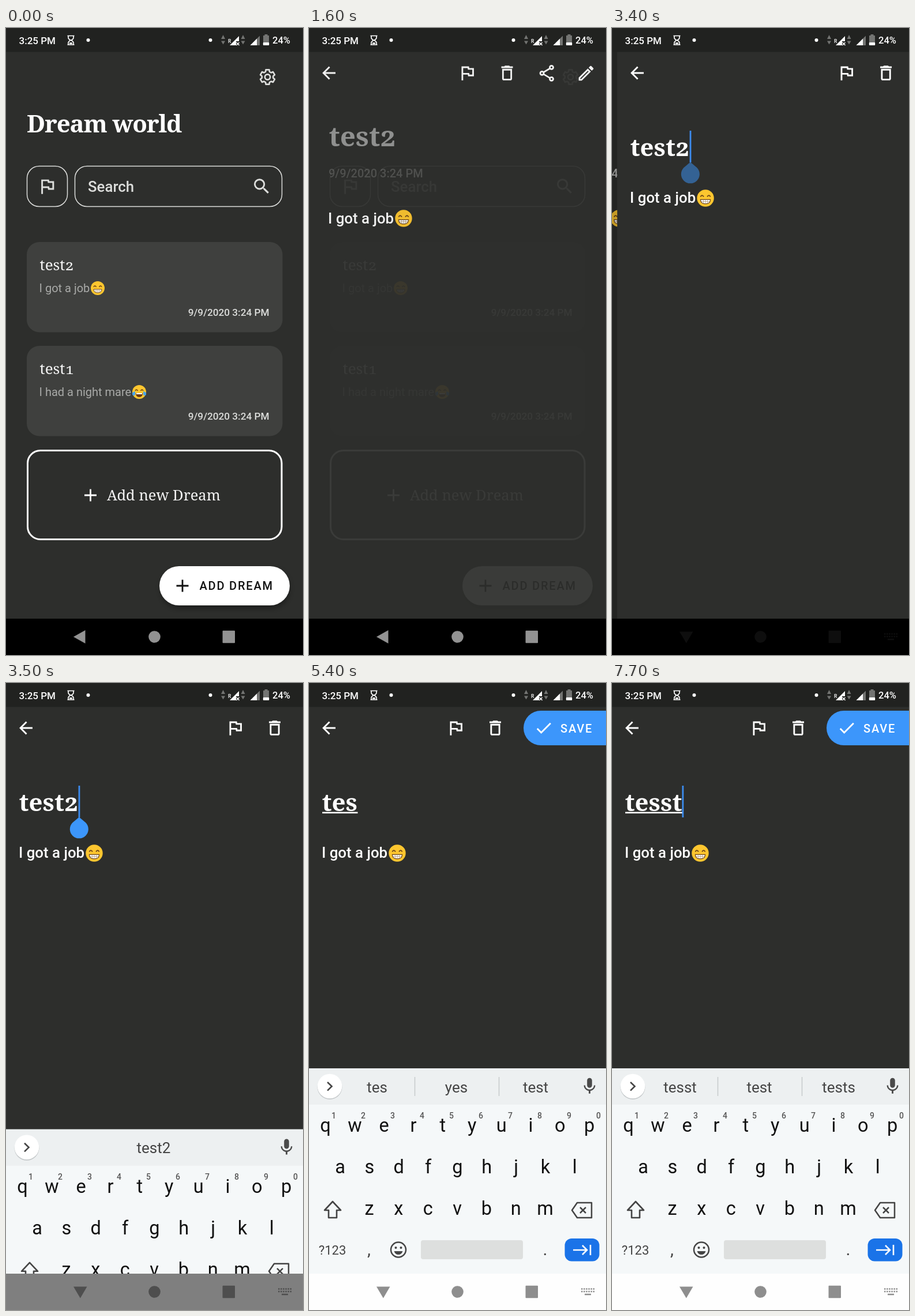
Animation of 515x1087 px, one loop 8000 ms. Source, as an HTML page:

```html
<!DOCTYPE html>
<html lang="en">
<head>
<meta charset="utf-8">
<title>Dream journal</title>
<style>
html, body { margin: 0; height: 100%; overflow: hidden; background: #2d2e2c; }
svg { display: block; width: 100vw; height: 100vh; font-family: Roboto, sans-serif; }
text { white-space: pre; }
.slab { font-family: "Noto Serif", serif; font-variant-numeric: oldstyle-nums; }
.bold { font-weight: 700; }
.medium { font-weight: 500; }
.line { fill: none; stroke: currentColor; }
</style>
</head>
<body>
<svg id="stage" viewBox="0 0 515 1087" preserveAspectRatio="none"></svg>
<script>
const stage = document.getElementById('stage');
const BG = '#2d2e2c', BLUE = '#3c96fb';

// Icons on a 24 unit grid
const ICONS = {
  flag: 'M12.36 6l.4 2H18v6h-3.36l-.4-2H7V6h5.36M14 4H5v17h2v-7h5.6l.4 2h7V6h-5.6L14 4z',
  trash: 'M6 19c0 1.1.9 2 2 2h8c1.1 0 2-.9 2-2V7H6v12zM8 9h8v10H8V9zm7.5-5l-1-1h-5l-1 1H5v2h14V4h-3.5z',
  pencil: 'M14.06 9.02l.92.92L5.92 19H5v-.92l9.06-9.06M17.66 3c-.25 0-.51.1-.7.29l-1.83 1.83 3.75 3.75 1.83-1.83c.39-.39.39-1.02 0-1.41l-2.34-2.34c-.2-.2-.45-.29-.71-.29zm-3.6 3.19L3 17.25V21h3.75L17.81 9.94l-3.75-3.75z',
  back: 'M20 11H7.83l5.59-5.59L12 4l-8 8 8 8 1.41-1.41L7.83 13H20v-2z',
  check: 'M9 16.17L4.83 12l-1.42 1.41L9 19 21 7l-1.41-1.41L9 16.17z',
  search: 'M15.5 14h-.79l-.28-.27A6.47 6.47 0 0 0 16 9.5 6.5 6.5 0 1 0 9.5 16c1.61 0 3.09-.59 4.23-1.57l.27.28v.79l5 4.99L20.49 19l-4.99-5zm-6 0C7.01 14 5 11.99 5 9.5S7.01 5 9.5 5 14 7.01 14 9.5 11.99 14 9.5 14z',
  mic: 'M12 14c1.66 0 3-1.34 3-3V5c0-1.66-1.34-3-3-3S9 3.34 9 5v6c0 1.66 1.34 3 3 3zm5.3-3c0 3-2.54 5.1-5.3 5.1S6.7 14 6.7 11H5c0 3.41 2.72 6.23 6 6.72V21h2v-3.28c3.28-.48 6-3.3 6-6.72h-1.7z'
};

const icon = (name, x, y, fill = '#fff', scale = 1.43) =>
  `<path d="${ICONS[name]}" fill="${fill}" transform="translate(${x} ${y}) scale(${scale}) translate(-12 -12)"/>`;
const text = (x, y, content, size, fill = '#fff', cls = '', extra = '') =>
  `<text x="${x}" y="${y}" font-size="${size}" fill="${fill}" class="${cls}" ${extra}>${content}</text>`;
const rect = (x, y, w, h, r, fill, extra = '') =>
  `<rect x="${x}" y="${y}" width="${w}" height="${h}" rx="${r}" fill="${fill}" ${extra}/>`;
const circle = (x, y, r, fill, extra = '') => `<circle cx="${x}" cy="${y}" r="${r}" fill="${fill}" ${extra}/>`;
const line = (d, color, width, extra = '') =>
  `<path d="${d}" class="line" color="${color}" stroke-width="${width}" ${extra}/>`;
const shape = (d, fill, extra = '') => `<path d="${d}" fill="${fill}" ${extra}/>`;
const plus = (x, y, color) => line(`M${x - 10.5} ${y}h21M${x} ${y - 10.5}v21`, color, 2.8);
const END = 'text-anchor="end"', MID = 'text-anchor="middle"';

const emoji = (kind, x, y, r) => {
  const eyes = line('M-7-2q2-4 4.5 0M2.5-2q2.5-4 4.5 0', '#6b4318', 1.5);
  const mouth = kind === 'grin'
    ? shape('M-7 2H7q0 6-7 6t-7-6z', '#fff', 'stroke="#6b4318"') + line('M-6.5 4.8H6.5M-3 2v5.6M0 2v6M3 2v5.6', '#a98a60', .6)
    : shape('M-6 2H6q0 7-6 7t-6-7z', '#6b3a16') + shape('M-5 2H5v2H-5z', '#fff')
      + shape('M-7-1q-6 1-5 5t5 1zM7-1q6 1 5 5t-5 1z', '#4aa5e8');
  return `<g transform="translate(${x} ${y}) scale(${r / 12})">${circle(0, 0, 12, '#fdc62f')}${eyes}${mouth}</g>`;
};

const gear = (x, y) => {
  const points = [];
  for (let k = 0; k < 6; k++)
    for (const [turn, r] of [[-13, 13], [13, 13], [21, 9.8], [39, 9.8]]) {
      const a = (k * 60 - 90 + turn) * Math.PI / 180;
      points.push((x + r * Math.cos(a)).toFixed(1) + ' ' + (y + r * Math.sin(a)).toFixed(1));
    }
  return line('M' + points.join('L') + 'z', '#dcdddb', 2.7, 'stroke-linejoin="round"')
    + circle(x, y, 4.6, 'none', 'stroke="#dcdddb" stroke-width="2.7"');
};

const card = (y, title, body, kind, emojiX) =>
  rect(36, y, 443.5, 156.5, 22, '#3f403e')
  + text(58.5, y + 49, title, 26, '#f4f4f4', 'slab')
  + text(57.5, y + 87, body, 20, '#a9aaa8')
  + emoji(kind, emojiX, y + 80, 12)
  + text(456.5, y + 128, '9/9/2020 3:24 PM', 17.2, '#dcdddb', 'medium', END);

const home = () =>
  gear(453.5, 85)
  + text(36, 181, 'Dream world', 42, '#fff', 'slab bold', 'id="heading" letter-spacing="-1.2"')
  + rect(36.5, 239.5, 70, 70, 21, 'none', 'stroke="#dcdddb" stroke-width="1.5"')
  + rect(119.5, 239.5, 359, 70, 21, 'none', 'stroke="#dcdddb" stroke-width="1.5"')
  + icon('flag', 71.5, 274.5, '#dcdddb', 1.48)
  + text(142, 284, 'Search', 25.8, '#dcdddb', 'medium')
  + icon('search', 443.3, 274.5, '#dcdddb', 1.48)
  + card(371, 'test2', 'I got a job', 'grin', 159)
  + card(551, 'test1', 'I had a night mare', 'joy', 231)
  + rect(37.5, 732.5, 440.5, 154, 22, 'none', 'stroke="#fff" stroke-width="3"')
  + plus(146.5, 810, '#fff') + text(175, 819, 'Add new Dream', 25.5, '#f4f4f4', 'slab')
  + rect(268, 937, 224, 69, 34, '#000', 'opacity=".35" filter="url(#blur)"')
  + rect(266, 933, 226, 68, 34, '#fff')
  + plus(306, 967, '#111') + text(335.5, 974, 'ADD DREAM', 20, '#111', 'medium', 'letter-spacing="1.8"');

const detail = () =>
  rect(0, 41, 515, 983, 0, BG)
  + icon('back', 34.5, 78) + icon('flag', 274.5, 78) + icon('trash', 343.5, 78) + icon('pencil', 480.5, 78.5)
  + line('M420.5 68.5L404 78.3l16.5 10', '#fff', 2.7)
  + [[420.5, 68.3], [404, 78.3], [420.5, 88.3]].map(([x, y]) => circle(x, y, 3, BG, 'stroke="#fff" stroke-width="2.8"')).join('')
  + text(34.5, 205, 'test2', 47.5, '#fff', 'slab bold', 'id="detailTitle"')
  + text(34, 259, '9/9/2020 3:24 PM', 20, '#b9bab8', 'medium', 'id="detailDate"')
  + text(33, 339, 'I got a job', 25.8, '#fff', 'medium') + emoji('grin', 164, 330, 14.7);

const edit = () =>
  rect(-9, 41, 9, 983, 0, '#000', 'opacity=".22"')
  + rect(0, 41, 515, 983, 0, BG)
  + icon('back', 34.5, 78)
  + `<g id="actions">${icon('flag', 397.5, 78)}${icon('trash', 466, 78)}
      ${shape('M545 48a30 30 0 0 0 0 60H665V48z', BLUE)}
      ${icon('check', 550, 78)}${text(579, 85.5, 'SAVE', 20, '#fff', 'medium', 'letter-spacing="1.8"')}</g>`
  + text(22.5, 222, '', 42, '#fff', 'slab bold', 'id="title"')
  + rect(23, 223.5, 0, 2.6, 0, '#fff', 'id="underline"')
  + rect(0, 178, 2.8, 55, 0, '#3c8cf0', 'id="caret"')
  + shape('M0 0L11.3 9.5A16 16 0 1 1-11.3 9.5z', BLUE, 'id="handle" transform="translate(126.8 232.5)"')
  + text(22, 303, 'I got a job', 25.8, '#fff', 'medium') + emoji('grin', 153, 295, 14.7);

const status = () => {
  const arrows = x => shape(`M${x - 3.5} 19l3.5-7 3.5 7zM${x - 3.5} 22.5h7l-3.5 6z`, '#737472');
  return rect(0, 0, 515, 41.5, 0, '#212220')
    + text(22.5, 28, '3:25 PM', 17, '#fff', 'medium')
    + line('M106.5 13.5h12M106.5 29h12M108 14v3q0 2 4 4.2q-4 2.300-4 4.300v3M117 14v3q0 2-4 4.200q4 2.300 4 4.300v3', '#fff', 1.7)
    + line('M110 26.500h5', '#fff', 2.500)
    + circle(142.500, 21, 3, '#fff') + circle(354.500, 21, 3, '#fff')
    + arrows(376.500) + text(385, 26, 'R', 8.500, '#fff', 'medium')
    + shape('M388 30L404 14V23h-5v7z', '#fff') + line('M399.500 25l5 5m0-5l-5 5', '#fff', 1.500) + arrows(411)
    + shape('M423.500 30L440 13.500V30z', '#737472') + shape('M423.500 30L435 18.500V30z', '#fff')
    + shape('M446 13h2.500v-2h5v2h2.500v13h-10z', '#737472') + rect(445.800, 25, 10.400, 5, 1, '#fff')
    + text(462, 27, '24%', 16.500, '#fff', 'medium');
};

const keyboard = () => {
  const keys = (row, x, y) => [...row].map((k, i) => text(x + i * 50.85, y, k, 32.5, '#111', '', MID)).join('');
  const hints = [...'1234567890'].map((n, i) => text(43 + i * 51, 755, n, 14, '#555', 'medium', MID)).join('');
  return rect(0, 668, 515, 420, 0, '#f5f8f9') + rect(0, 668, 515, 63, 0, '#edf0f1')
    + circle(36, 700.5, 21.5, '#c4c8ca') + circle(36, 699, 21.3, '#fff')
    + line('M32 692l7.500 7.300-7.500 7.300', '#444', 2.600)
    + icon('mic', 486.500, 699, '#4a4a4a', 1.420)
    + '<g id="suggestions"></g>'
    + keys('qwertyuiop', 28.5, 778) + hints + keys('asdfghjkl', 54, 850) + keys('zxcvbnm', 104.5, 922)
    + line('M41 899l14 15h-7v13H34V914h-7z', '#444', 2.6, 'stroke-linejoin="round"')
    + line('M465 901h25v26h-25l-9-13zM470 909l10 10m0-10l-10 10', '#444', 2.5, 'stroke-linejoin="round"')
    + text(40.5, 991, '?123', 22, '#444', '', MID) + text(104, 992, ',', 30, '#444', '', MID) + text(409.500, 992, '.', 30, '#444', '', MID)
    + circle(155, 982.5, 13, 'none', 'stroke="#444" stroke-width="2.5"')
    + circle(150.5, 979, 2, '#444') + circle(159.5, 979, 2, '#444') + shape('M147.5 985h15q-2 6-7.500 6t-7.500-6z', '#444')
    + rect(194, 966, 177, 33, 4, '#dddfde') + rect(443.500, 963, 60, 39.500, 12, '#1a73e8')
    + line('M458 983h24m-8-8l8 8-8 8M488 974v18', '#fff', 2.600);
};

const nav = () =>
  rect(0, 1024, 515, 63, 0, '#000', 'id="navBar"')
  + `<g id="navIcons">${shape('M117 1055.5l20.500-11.500v23z', 'currentColor', 'id="navBack"')}
     ${shape('M117 1046.500h23.500l-11.700 20z', 'currentColor', 'id="navDown"')}
     ${circle(257.500, 1055.500, 10.300, 'currentColor')}${rect(375.500, 1044.800, 21.500, 21.500, 1, 'currentColor')}
     <g id="navKeys">${line('M472 1050.500h23M472 1055h23', 'currentColor', 2.500, 'stroke-dasharray="2.500 1.600"')}
     ${line('M478 1060h11', 'currentColor', 2.500)}</g></g>`;

stage.innerHTML = `<defs><filter id="blur" x="-20%" y="-50%" width="140%" height="200%"><feGaussianBlur stdDeviation="4"/></filter></defs>`
  + rect(0, 0, 515, 1087, 0, BG)
  + Object.entries({ home, detail, edit, status, keyboard, nav }).map(([id, draw]) => `<g id="${id}Layer">${draw()}</g>`).join('');

const $ = id => document.getElementById(id);
const set = (id, name, value) => $(id).setAttribute(name, value);
const show = (id, visible) => set(id, 'opacity', +visible);
const progress = (t, from, to) => Math.min(1, Math.max(0, (t - from) / (to - from)));
const easeOut = p => 1 - (1 - p) ** 3;
const mix = (a, b, p) => Math.round(a + (b - a) * p);
const grey = v => `rgb(${v},${v},${v})`;

// Typed title with its suggestions, by start time
const TYPING = [
  [0, 'test2', 'test2'],
  [4600, 'test', 'test', 'rest', 'tests'],
  [5400, 'tes', 'tes', 'yes', 'test'],
  [5900, 'tess', 'tess', 'test', 'tests'],
  [6500, 'tesst', 'tesst', 'test', 'tests']
];
const CARET_TOGGLES = [3200, 4200, 4600, 5000, 5500, 6400, 6500, 7000, 7600];
let typed;

function type(entry) {
  if (typed === entry) return;
  typed = entry;
  const [, title, ...words] = entry;
  $('title').textContent = title;
  const width = $('title').getComputedTextLength();
  set('underline', 'width', width);
  set('caret', 'x', 22.5 + width);
  const single = words.length === 1;
  $('suggestions').innerHTML = words.map((w, i) =>
    text(single ? 256 : 118 + i * 137.5, 709.5, w, 26, '#444', '', MID)).join('')
    + (single ? '' : line('M183.500 683v33M329.500 683v33', '#c6cacc', 1.500));
}

function render(t) {
  show('homeLayer', t < 1700);
  set('heading', 'opacity', 1 - progress(t, 900, 1300));

  const slide = t < 3300 ? 515 : t < 3500 ? 515 * Math.exp(-(t - 3200) * .0202) : 0;
  set('detailLayer', 'opacity', t < 3500 ? easeOut(progress(t, 1400, 1730)) : 0);
  set('detailLayer', 'transform', `translate(${(slide - 515) * .3})`);
  set('detailTitle', 'opacity', progress(t, 1400, 1800));
  set('detailDate', 'opacity', progress(t, 1420, 2100));

  show('editLayer', t >= 3300);
  set('editLayer', 'transform', `translate(${slide})`);
  type(TYPING.findLast(entry => t >= entry[0]));
  show('underline', t >= 3700);
  show('caret', CARET_TOGGLES.filter(at => t >= at).length % 2);
  set('handle', 'opacity', t < 4600 ? progress(t, 3300, 3500) : 0);
  set('actions', 'transform', `translate(${-143 * easeOut(progress(t, 4600, 4900))})`);

  show('keyboardLayer', t >= 3500);
  set('keyboardLayer', 'transform', `translate(0 ${357 * (1 - easeOut(progress(t, 3400, 3700)))})`);
  const light = progress(t, 3400, 3600), editing = t >= 3400;
  set('navBar', 'fill', grey(mix(0, 254, light)));
  set('navIcons', 'color', grey(editing ? mix(14, 142, light) : 146));
  show('navBack', !editing);
  show('navDown', editing);
  show('navKeys', editing);
}

function tick(now) {
  render(Math.floor(now % 8000 / 100) * 100);
  requestAnimationFrame(tick);
}
render(0);
requestAnimationFrame(tick);
</script>
</body>
</html>
```
